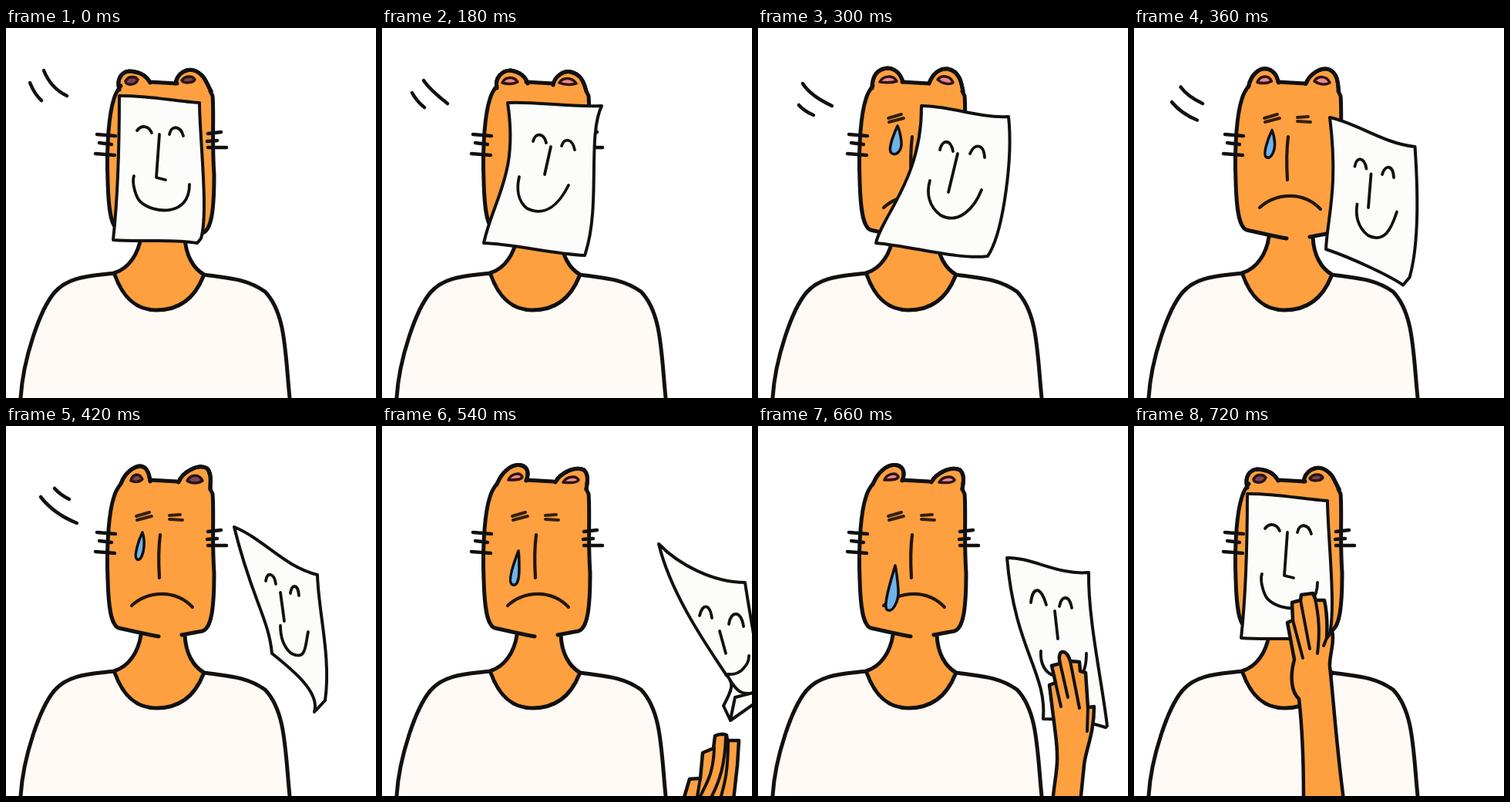
Animation, 480 px wide and 480 px high, one loop 780 ms. Source, as an HTML page with a canvas:

```html
<!DOCTYPE html>
<html>
<head>
<meta charset="utf-8">
<style>
html, body { margin: 0; height: 100%; overflow: hidden; background: #fff; }
canvas { display: block; width: 100vw; height: 100vh; }
</style>
</head>
<body>
<canvas id="stage" width="480" height="480"></canvas>
<script>
const ctx = document.getElementById('stage').getContext('2d');
const INK = '#111', FUR = '#ffa040', PAPER = '#fcfcfa', SHIRT = '#fffaf5';
ctx.lineCap = ctx.lineJoin = 'round';

function draw(path, width, fill, ink = INK) {
  const shape = new Path2D(path);
  if (fill) {
    ctx.fillStyle = fill;
    ctx.fill(shape);
  }
  if (width) {
    ctx.lineWidth = width;
    ctx.strokeStyle = ink;
    ctx.stroke(shape);
  }
}

// Fixed parts
const headLine = 'M198 273C180 270 160 265 146 262C136 258 133 235 132 200C130 150 134 110 140 92C142 85 145 80 149 75'
  + ' M187 70L222 72 M265 82L268 88C270 112 267 150 270 190C270 240 266 262 255 266L228 271';
const headFill = headLine.replace(/ M/g, 'L');
const collar = 'C150 345 165 366 195 366C225 366 245 350 256 322';
const neckLine = 'M175 271C172 292 160 312 140 318 M232 271C233 295 243 312 257 320';
const neckFill = 'M175 264C173 292 160 312 141 320' + collar + 'C243 312 233 295 232 264Z';
const leftSide = 'M19 480C22 430 44 365 63 343C82 321 112 322 140 318';
const rightSide = 'M368 480C362 420 363 370 336 342C312 325 290 325 257 320';
const shirt = leftSide + 'L141 320' + collar + 'C290 325 312 325 336 342C363 370 362 420 368 480Z';
const whiskers = 'M118 138L142 140M121 149L137 151M116 163L141 165M262 137L279 135M261 147L274 146M262 155L286 155';
const brows = 'M169 117L186 112M170 122L189 117M212 116L226 115M212 121L229 122';
const frown = 'M200 141Q197 165 199 197M163 233C185 213 220 212 242 235';

const reach = 'M391 485L399 458L413 457L416 424L430 418L432 402Q440 398 447 401L448 408L463 408L461 440L456 485';
const reachLines = 'M413 457L409 480M431 417C430 450 422 462 413 480M446 402C445 440 438 460 428 480M449 409C449 450 444 465 440 480';
const grip = 'M381 530L383 480C386 450 391 440 386 400L378 336L386 333L381 311L392 308C387 290 400 287 405 305L417 306L418 318L425 320L428 365L436 364C436 400 425 420 423 440L419 480L418 530';
const gripLines = 'M386 333L393 364M392 308L402 352M405 305L417 366M428 365L427 396';
const press = 'M220 485C220 420 217 380 214 354C204 345 202 325 208 303L199 255L206 252L205 229L216 226L217 219L232 217L236 226L247 226C250 240 251 258 250 275L257 266C261 280 253 298 254 312C258 345 262 410 272 485';
const pressLines = 'M206 252L219 301M216 226L228 289M234 220C241 250 241 270 238 295M250 275L246 285';

// Key poses; the ones after the first two stand two steps apart
const keys = [
  {
    sheet: 'M147 88C180 87 220 95 251 97C251 140 263 240 253 273L248 279C215 273 180 278 139 275C145 220 147 150 147 88Z',
    face: 'M170 133C176 125 185 127 189 136M212 138C214 126 226 126 230 140M199 138L195 194L207 197M166 192C163 200 168 220 175 226C192 241 238 245 238 203',
    ears: 'M147 80C143 66 150 57 160 56C175 57 182 62 187 71M220 72C222 58 235 52 244 55C258 60 260 72 266 82',
    inner: 'M155 69C158 62 168 62 171 67C168 75 155 75 155 69M228 68C232 62 242 61 245 67C242 72 230 72 228 68',
    tear: 'M181 127C176 138 168 158 173 162C178 167 187 160 186 148C185 138 183 131 181 127',
    dashes: 'M31 71Q37 86 46 94M49 55Q58 78 79 88', dark: true
  },
  {
    sheet: 'M163 97C200 95 240 103 285 101C266 140 284 230 264 292L263 295C220 293 170 280 132 279C145 220 177 190 163 97Z',
    face: 'M196 147C199 135 210 136 213 149M233 153C236 142 247 143 250 158M219 154L211 190L211 190M178 193C174 210 177 225 188 234C212 246 230 228 242 204',
    ears: 'M149 78C146 64 156 55 167 55C178 57 186 62 189 72M222 74C224 62 236 55 245 57C258 60 262 70 265 82',
    inner: 'M156 71C160 63 171 62 176 70C170 73 162 73 156 71M230 71C234 64 246 63 252 72C246 74 236 74 230 71',
    tear: 'M181 127C176 138 168 158 173 162C178 167 187 160 186 148C185 138 183 131 181 127',
    dashes: 'M39 84Q45 95 55 103M54 68Q62 80 85 98'
  },
  {
    sheet: 'M212 101C245 100 285 117 325 115C331 170 318 260 301 291L298 296C260 301 200 283 153 279C160 245 213 195 212 101Z',
    face: 'M236 158C239 144 250 144 253 160M275 163C281 149 293 150 294 168M259 163L247 213L247 213M223 198C218 215 222 232 237 243C260 255 280 235 290 210',
    ears: 'M148 78C148 62 155 53 168 52C180 53 185 60 188 70M222 72C226 60 235 52 246 53C262 56 264 72 266 82',
    inner: 'M158 70C162 62 175 60 180 69C174 71 165 71 158 70M233 67C238 60 250 62 253 71C247 74 239 72 233 67',
    tear: 'M181 127C176 138 168 158 173 162C178 167 187 160 186 148C185 138 183 131 181 127',
    dashes: 'M53 100Q60 108 72 113M58 72Q68 88 96 101'
  },
  {
    sheet: 'M296 131C335 147 360 182 404 193C405 240 422 300 414 356L400 371C408 345 370 315 345 295C341 250 318 222 296 131Z',
    face: 'M337 201C338 189 348 190 350 205M369 217C370 205 379 204 380 220M356 216L361 253L361 253M356 259C356 270 358 285 370 295C390 305 388 285 392 267',
    ears: 'M149 75C155 58 172 47 181 55C186 60 186 66 187 72M224 73C228 60 250 48 261 55C267 62 265 72 265 82',
    inner: 'M162 71C164 62 173 60 177 69C173 73 167 73 162 71M235 71C239 63 250 61 255 71C249 75 241 75 235 71',
    tear: 'M177 138C172 148 165 170 170 173C176 176 180 160 179 148C179 144 178 141 177 138',
    dashes: 'M45 92Q62 114 92 126M63 81Q70 89 82 95', dark: true
  },
  {
    sheet: 'M359 153C385 180 430 203 471 203C474 225 484 280 492 330L486 345C462 352 459 340 446 322C425 290 375 220 359 153Z',
    face: 'M412 246C416 230 425 230 428 249M450 257C452 240 466 238 469 260M438 266L446 295L446 295M449 322C458 323 466 319 470 313C474 309 476 304 476 298',
    ears: 'M149 76C154 62 167 48 181 51C191 54 190 64 187 71M225 73C230 62 250 51 262 57C269 64 266 74 265 82',
    inner: 'M164 70C167 62 179 59 182 66C181 70 172 70 164 70M235 73C239 66 251 63 255 70C253 74 244 74 235 73',
    tear: 'M177 162C172 175 163 200 168 205C175 210 178 200 178 185C178 175 178 168 177 162',
    flap: 'M446 322C458 334 454 342 443 363L452 382L486 358V345L458 352L452 381',
    hand: reach, fingers: reachLines
  },
  {
    sheet: 'M323 171C355 170 390 194 429 190C428 250 446 330 453 389L451 391C430 384 400 380 370 380C375 320 333 290 323 171Z',
    face: 'M354 229C356 210 366 205 374 232M391 234C394 219 404 219 407 236M385 240L389 276L389 276M367 292C366 308 372 320 384 324C418 340 426 320 426 295',
    ears: 'M149 76C154 62 167 48 181 51C191 54 190 64 187 71M225 73C230 62 250 51 262 57C269 64 266 74 265 82',
    inner: 'M164 70C167 62 179 59 182 66C181 70 172 70 164 70M235 73C239 66 251 63 255 70C253 74 244 74 235 73',
    tear: 'M178 181C174 195 162 232 167 238C174 244 183 228 182 212C181 200 180 190 178 181',
    hand: grip, fingers: gripLines
  }
];

// Halfway between two paths of the same structure
function mixPath(a, b) {
  const ends = b.match(/\d+/g);
  let i = 0;
  return a.replace(/\d+/g, n => (+n + +ends[i++]) / 2);
}

function mix(a, b) {
  const pose = {};
  for (const part of ['sheet', 'face', 'ears', 'inner', 'tear', 'dashes'])
    if (a[part] && b[part]) pose[part] = mixPath(a[part], b[part]);
  return pose;
}

const steps = [keys[0], keys[1]];
for (let i = 2; i < keys.length; i++) steps.push(mix(keys[i - 1], keys[i]), keys[i]);
Object.assign(steps[8], { hand: grip, fingers: gripLines, shift: [14, 40] });
steps.push({ ...keys[0], dashes: '', hand: press, fingers: pressLines });

function render(pose) {
  ctx.fillStyle = '#fff';
  ctx.fillRect(0, 0, 480, 480);
  if (pose.dashes) draw(pose.dashes, 4.5);

  draw(neckFill, 0, FUR);
  draw(pose.ears, 5, FUR);
  draw(headFill, 2, FUR, FUR);
  draw(pose.ears, 5);
  draw(pose.inner, 3.5, pose.dark ? '#7a4350' : '#f0868a', '#2a1414');
  draw(headLine, 5);
  draw(whiskers, 4.5);
  draw(brows, 4, null, '#35200c');
  draw(frown, 4.2, null, '#22150a');
  draw(pose.tear, 3.5, '#6fb2ec');

  draw(shirt, 0, SHIRT);
  draw(neckLine + leftSide + rightSide + 'M141 320' + collar, 5);

  draw(pose.sheet, 4, PAPER);
  draw(pose.face, 3.8);
  if (pose.flap) draw(pose.flap, 4, PAPER);

  if (pose.hand) {
    ctx.save();
    ctx.translate(...(pose.shift || [0, 0]));
    draw(pose.hand, 4.5, FUR);
    draw(pose.fingers, 4);
    ctx.restore();
  }
}

function tick() {
  const t = performance.now() % 780;
  render(steps[t < 180 ? 0 : Math.floor((t - 120) / 60)]);
  requestAnimationFrame(tick);
}
tick();
</script>
</body>
</html>
```
